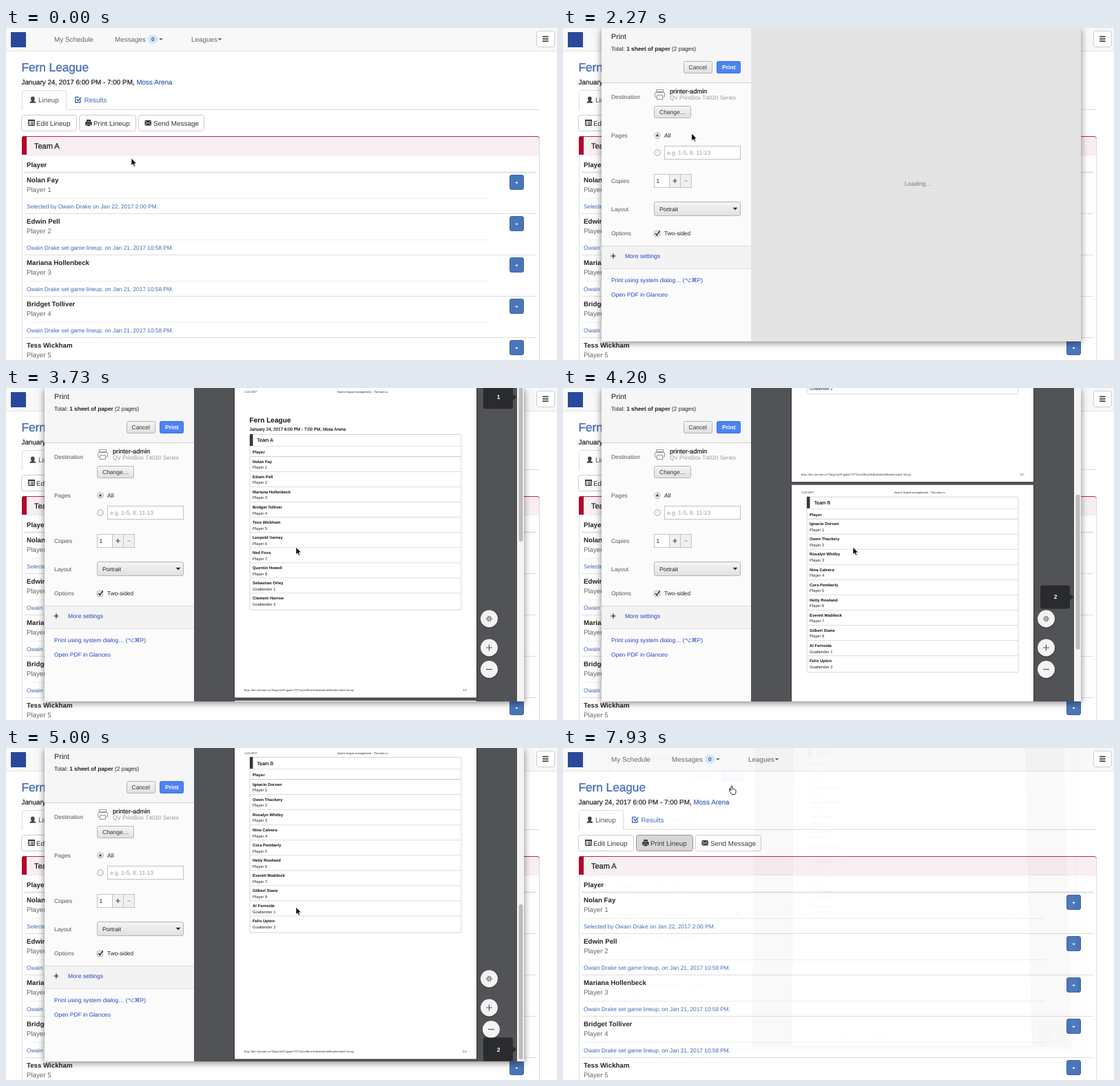
Recreate the animation shown at these times as an HTML page. Size 800x482 px, loop 8000 ms.

```html
<!DOCTYPE html>
<html lang="en">
<head>
<meta charset="utf-8">
<title>Print lineup</title>
<style>
html, body { margin: 0; width: 100%; height: 100%; overflow: hidden; background: #fff; }
svg { position: absolute; left: 0; top: 0; display: block; }
text { font-family: "Liberation Sans", Arial, sans-serif; white-space: pre; text-rendering: geometricPrecision; }
.serif { font-family: "Liberation Serif", serif; }
#dialog {
  position: absolute; left: 56px; top: 0; width: 696px; height: 455px; background: #fff;
  transform-origin: 50% 0; box-shadow: 0 2px 10px rgba(0,0,0,.5);
}
</style>
</head>
<body>
<svg id="page" width="800" height="482"></svg>
<div id="dialog"><svg id="sheet" width="696" height="455" viewBox="56 0 696 455"></svg></div>
<svg id="pointer" width="800" height="482">
  <path id="arrow" d="M0 0V10.8L2.4 8.6 4.1 12.2 5.9 11.4 4.3 7.9H7.6Z" stroke="#fff" stroke-width=".8"/>
  <path id="hand" d="M3 6.5V1.2Q3-.2 4-.2T5 1.2V4.4Q6.6 3.7 6.9 4.9 8.4 4.4 8.6 5.6 10 5.4 10 6.8V9Q10 11 8.8 12.4H4Q2.6 10 .6 7.6 1-.2 1.6 6Z" fill="#fff" stroke="#222" stroke-width=".9"/>
</svg>
<script>
const $ = id => document.getElementById(id);
const INK = '#333', GREY = '#666', BLUE = '#3f68b3', LINK = '#2440c8';

// y is the vertical middle of the letters
const text = (x, y, str, size, fill = INK, more = '') =>
  `<text x="${x}" y="${y + size * .36}" font-size="${size}" fill="${fill}" ${more}>${str}</text>`;
const bold = (x, y, str, size, fill = '#222', more = '') => text(x, y, str, size, fill, 'font-weight="700" ' + more);
const medium = (x, y, str, size, fill) => text(x, y, str, size, fill, `stroke="${fill}" stroke-width="${size * .025}"`);
const rect = (x, y, w, h, fill, more = '') =>
  `<rect x="${x}" y="${y}" width="${w}" height="${h}" fill="${fill}" ${more}/>`;
const box = (x, y, w, h, fill, stroke, r = 0, more = '') =>
  rect(x + .5, y + .5, w - 1, h - 1, fill, `stroke="${stroke}" rx="${r}" ${more}`);
const rule = (x1, x2, y, color, w = 1) => `<path d="M${x1} ${y}H${x2}" stroke="${color}" stroke-width="${w}"/>`;
const path = (d, fill, more = '') => `<path d="${d}" fill="${fill}" ${more}/>`;
const line = (d, color, w = 1) => path(d, 'none', `stroke="${color}" stroke-width="${w}"`);
const caret = (x, y, r, fill) => path(`M${x - r} ${y - r / 2}h${2 * r}l${-r} ${r}z`, fill);

const teamA = ['Nolan Fay', 'Edwin Pell', 'Mariana Hollenbeck', 'Bridget Tolliver', 'Tess Wickham',
  'Leopold Varney', 'Ned Foss', 'Quentin Howell', 'Sebastian Orley', 'Clement Harrow'];
const teamB = ['Ignacio Dorsen', 'Owen Thackery', 'Rosalyn Whitby', 'Nina Calvera', 'Cora Pemberly',
  'Hetty Rowland', 'Everett Maddock', 'Gilbert Stane', 'Al Fernside', 'Felix Upton'];
const league = 'Fern League', arena = 'Moss Arena', when = 'January 24, 2017 6:00 PM - 7:00 PM, ';

function navbar() {
  return rect(0, 0, 800, 34, '#f8f8f8') + rule(0, 800, 33.5, '#e3e3e3') +
    rect(7, 6, 22, 22, '#28489c') +
    text(70, 16, 'My Schedule', 9.9, GREY) +
    text(158, 16, 'Messages', 9.9, GREY) +
    rect(206, 10, 14.5, 12.5, '#d3e5f7', 'rx="6"') + bold(211, 16.3, '0', 8, '#2f5da8') + caret(225, 16.5, 2.8, GREY) +
    text(269, 16, 'Leagues', 9.9, GREY) + caret(310.5, 16.5, 2.8, GREY) +
    box(770, 4, 27, 24, '#fff', '#ccc', 3) +
    [12.5, 15.8, 19.1].map(y => rule(779, 787.5, y, INK, 1.6)).join('');
}

function toolbar() {
  return rule(22, 775, 118.5, '#ddd') +
    path('M23.5 119V93q0-2.5 2.5-2.5H85q2.5 0 2.5 2.5V119', '#fff', 'stroke="#ddd"') + rect(24, 118, 63, 2, '#fff') +
    path('M34.3 108.7q0-2.2 3-2.8-1.4-1.4-1.4-3.6 0-2.9 2.9-2.9t2.9 2.9q0 2.2-1.4 3.6 3 .6 3 2.8z', '#444') +
    text(47, 104.5, 'Lineup', 9.9, '#555') +
    line('M108 103.8v4.2h-7.3v-7.5h5.5', BLUE, 1.3) + line('M102.6 103.4l2.2 2.2 4.5-5', BLUE, 1.5) +
    text(113.5, 104.5, 'Results', 9.9, BLUE) +
    box(22, 126, 81, 24, '#fff', '#ccc', 3) + box(106, 126, 83, 24, '#fff', '#ccc', 3, 'id="printBtn"') +
    box(192, 126, 96, 24, '#fff', '#ccc', 3) +
    box(32, 133, 10, 9, '#fff', INK, .5) + rule(32, 42, 134, INK, 2) +
    [136.5, 138.5, 140.3].map(y => rule(33.5, 35, y, INK) + rule(36, 40.5, y, INK)).join('') +
    text(44, 138, 'Edit Lineup', 9.9) +
    path('M117 133h6v3.2h1.6v5h-2v-2h-5.4v2h-2v-5H117z', INK) + rect(117.6, 139.6, 4.6, 2.8, INK) + rule(118, 122, 136, '#fff', .7) +
    text(127, 138, 'Print Lineup', 9.9) +
    rect(201.5, 134, 9.5, 7.6, INK) + line('M201.5 134.6l4.7 4 4.8-4M201.5 141.4l3.2-3.2M211 141.4l-3.2-3.2', '#fff', .8) +
    text(214, 138, 'Send Message', 9.9);
}

function playerRow(name, i) {
  const y = 221 + i * 60;
  const note = i ? 'Owain Drake set game lineup. on Jan 21, 2017 10:58 PM.' : 'Selected by Owain Drake on Jan 22, 2017 2:00 PM.';
  return bold(30, y, name, 9.7) + text(30, y + 14, `Player ${i + 1}`, 9.7, GREY) +
    rule(34, 700, y + 26.5, '#eee') + text(30, y + 38.5, note, 8.3, BLUE) + rule(27, 770, y + 48.5, '#ddd') +
    box(731, y - 8, 21, 22, '#4a76b9', '#3c66a8', 2.5) + caret(741.5, y + 4, 2.4, '#fff');
}

$('page').innerHTML = navbar() +
  medium(22.5, 57, league, 17.2, '#4a72b8') +
  medium(22.5, 78, when + `<tspan fill="${BLUE}" stroke="${BLUE}">${arena}</tspan>`, 9.9, '#222') +
  toolbar() +
  line('M23.5 184V482M774.5 160V482', '#ddd') +
  path('M23 184v-24q0-3 3-3h745q3 0 3 3v24z', '#f8eff1') + line('M25 157.5H772.5L774.5 160', '#c32344') +
  path('M23 184v-24q0-3 3-3h4v27z', '#b0062c') +
  path('M30 184.5H774', 'none', 'stroke="#eccbd2" stroke-dasharray="1 1"') +
  medium(41, 171.5, 'Team A', 11, '#222') +
  bold(30, 198.5, 'Player', 9.7) + rule(27, 770, 209.5, '#d8d8d8', 1.5) +
  teamA.slice(0, 5).map(playerRow).join('');

function sidebar() {
  const label = (y, str) => text(70, y, str, 8.4, '#555');
  const button = (x, y, w, h, str, tx) => box(x, y, w, h, 'url(#btn)', '#b5b5b5', 2) + text(tx, y + h / 2, str, 8.5);
  const radio = y => `<circle cx="137" cy="${y}" r="4.3" fill="#f6f6f6" stroke="#aaa"/>`;
  return rect(56, 0, 217, 455, '#fbfbfb') + rect(56, 0, 217, 79, '#f6f6f6') + rule(56, 273, 79.5, '#ccc') +
    text(70, 12, 'Print', 10.7, '#222') +
    text(70, 30.5, 'Total: <tspan font-weight="700">1 sheet of paper</tspan> (2 pages)', 8.3, '#222') +
    button(175, 48, 42, 18, 'Cancel', 182.5) +
    box(223, 48, 35, 18, '#4d82f3', '#3f70dd', 2, 'id="go"') + bold(231, 57, 'Print', 8.6, '#fff') +
    label(100, 'Destination') +
    medium(155, 91.5, 'printer-admin', 9.2, '#222') + text(155, 101.5, 'QV PrintBox T4020 Series', 8.2, '#999') +
    box(135, 89, 11, 4, '#fff', '#999') + box(133, 93, 15, 8, '#fff', '#999', 1.5) + box(136, 97, 9, 7, '#fff', '#999') +
    button(132, 113, 54, 18, 'Change…', 140) +
    label(156, 'Pages') + radio(156) + '<circle cx="137" cy="156" r="1.9" fill="#555"/>' + text(147, 156, 'All', 8.6, '#222') +
    radio(181) + box(147, 171, 111, 20, '#fff', '#c2c2c2') + text(151, 181, 'e.g. 1-5, 8, 11-13', 8.4, '#999') +
    label(222, 'Copies') + box(132, 212, 23, 20, '#fff', '#c2c2c2') + text(135.5, 222, '1', 8.4, '#222') +
    box(154, 212, 17, 20, '#f0f0f0', '#c2c2c2') + line('M159.5 222h6M162.5 219v6', '#444', 1.2) +
    box(170, 212, 17, 20, '#f0f0f0', '#c2c2c2') + rule(176, 181, 222, '#aaa', 1.2) +
    label(262.5, 'Layout') + box(132, 252, 126, 21, 'url(#btn)', '#b5b5b5', 2) + text(140, 262.5, 'Portrait', 8.4, '#222') + caret(250, 262.5, 3.4, '#222') +
    label(298, 'Options') + box(132, 294, 9, 9, '#f6f6f6', '#aaa', 1) + line('M134 298l2.3 2.8 4.4-6.3', '#333', 1.6) +
    text(147, 298, 'Two-sided', 8.4, '#222') +
    rect(56, 316, 217, 33, '#f3f3f3') + rule(56, 273, 316.5, '#ddd') + rule(56, 273, 349.5, '#ddd') +
    line('M69.5 331h7M73 327.5v7', '#555', 1.7) + text(90, 331, 'More settings', 8.5, LINK) +
    text(70, 365.5, 'Print using system dialog… (⌥⌘P)', 8.4, LINK) +
    text(70, 386.5, 'Open PDF in Glanceo', 8.4, LINK);
}

// One printed page; top is where the team table starts
function printed(y0, top, num, team, names) {
  const serif = (x, y, str) => text(x, y, str, 4.6, '#222', 'class="serif"');
  const row = (name, i) => {
    const y = top + 39.5 + i * 22.05;
    return bold(358, y, name, 5.9, '#111') + text(358, y + 8.8, i < 8 ? `Player ${i + 1}` : `Goaltender ${i - 7}`, 5.8, '#222') +
      (i < 9 ? rule(355, 661, y + 15, '#d5d5d5', .8) : '');
  };
  return `<g transform="translate(0 ${y0})">` +
    rect(330.5, -4, 354, 457, '#404246') + rect(332, -4, 351, 455.5, '#fff') +
    serif(346, 7, '1/22/2017') + serif(481, 7, 'Sports league management - Torvane.ca') +
    serif(346, 440.5, 'http://dev.torvane.ca/?lang=en#!/game/727/forceShowSubstitutionHeader/subst=recap') +
    serif(663, 440.5, num + '/2') +
    box(353.5, top, 308, 255.5, '#fff', '#d5d5d5', 1) + rect(354, top, 4.5, 17, '#36373b') + rule(354, 661, top + 17.5, '#ddd', .8) +
    medium(364.5, top + 9, team, 7, '#111') + bold(358, top + 26, 'Player', 5.9, '#111') + rule(355, 661, top + 32.5, '#ccc', 1) +
    names.map(row).join('') + '</g>';
}

const zooms = [335, 377, 408.5];
const zoomIcon = [
  'M700.3 331v3h-3M702.7 331v3h3M700.3 339v-3h-3M702.7 339v-3h3', 'M697 377h9M701.5 372.5v9', 'M697 408.5h9'];
$('sheet').innerHTML =
  '<defs><linearGradient id="btn" x2="0" y2="1"><stop stop-color="#f5f5f5"/><stop offset="1" stop-color="#e0e0e0"/></linearGradient></defs>' +
  `<g id="side">${sidebar()}${rect(273, 0, 479, 455, '#e4e4e4')}${text(496, 226, 'Loading…', 8.6, '#777')}</g>` +
  '<g id="pdf">' + rect(273, 0, 479, 455, '#525357') +
  '<g id="scroll">' + printed(0, 69, 1, 'Team A', teamA) + printed(460, 13, 2, 'Team B', teamB) +
  bold(353.5, 48, league, 10.1, '#111') + medium(353.5, 61.5, when + arena, 6.3, '#111') + '</g>' +
  zooms.map((y, i) => `<g id="zoom${i}"><circle cx="701.5" cy="${y + 1}" r="13" fill="#000" opacity=".25"/>` +
    `<circle cx="701.5" cy="${y}" r="12.5" fill="#f3f3f3"/>${line(zoomIcon[i], '#555', 1.2)}</g>`).join('') +
  '<g id="tag">' + path('M696-17h37q3 0 3 3V-4.5L741.5 0 736 4.5V14q0 3-3 3H696q-3 0-3-3V-14q0-3 3-3z', '#2a2b2e') +
  bold(715, 0, '1', 8.5, '#fff', 'id="tagNum" text-anchor="middle"') + '</g>' +
  rect(742, 0, 10, 455, '#f4f4f4') + rect(744.5, -3, 6, 225, '#bcbcbc', 'rx="3" id="thumb"') + '</g>';

const LOOP = 8000;
const ramp = (t, a, b) => Math.min(1, Math.max(0, (t - a) / (b - a)));
const smooth = u => u * u * (3 - 2 * u);
const show = (id, on) => { $(id).style.display = on ? '' : 'none'; };
const move = (id, x, y) => $(id).setAttribute('transform', `translate(${x} ${y})`);

// start, end, dx, dy of each pointer trip
const trips = [[0, 750, -37, -50], [2050, 2950, 276, 92], [5650, 6750, -177, -176]];

function draw(t) {
  let x = 182, y = 189;
  for (const [a, b, dx, dy] of trips) {
    const k = smooth(ramp(t, a, b));
    x += dx * k;
    y += dy * k;
  }
  const hand = (t > 620 && t < 1330) || t > 7870;
  show('arrow', !hand);
  show('hand', hand);
  move('arrow', x, y);
  move('hand', x - 3, y);

  const btn = $('printBtn'), pressed = t > 1000, hover = t > 620;
  btn.setAttribute('fill', pressed ? '#d6d6d6' : hover ? '#e8e8e8' : '#fff');
  btn.setAttribute('stroke', pressed ? '#909090' : hover ? '#adadad' : '#ccc');

  const open = ramp(t, 1250, 1450) * (1 - ramp(t, 7810, 7936)), fold = 1 - open;
  const d = $('dialog').style;
  d.visibility = open > 0 ? 'visible' : 'hidden';
  d.opacity = open;
  d.transform = fold ? `translateY(${-15 * fold}px) perspective(1200px) translateZ(${-58 * fold}px) rotateX(${6 * fold}deg)` : 'none';
  show('side', t >= 1850);
  show('pdf', t >= 2550);
  $('go').setAttribute('fill', t > 7100 && t < 7300 ? '#3a6be0' : '#4d82f3');

  const s = 460 * smooth(ramp(t, 3700, 4500));
  move('scroll', 0, -s);
  move('tag', 0, 11.5 + s * .926);
  move('thumb', 0, s / 2);
  $('tagNum').textContent = s > 230 ? 2 : 1;
  zooms.forEach((_, i) => {
    const start = 4950 + (2 - i) * 50;
    move('zoom' + i, 65 * ramp(t, start, start + 240) ** 2, 0);
  });
}

function tick() {
  draw(performance.now() % LOOP);
  requestAnimationFrame(tick);
}
tick();
</script>
</body>
</html>
```
